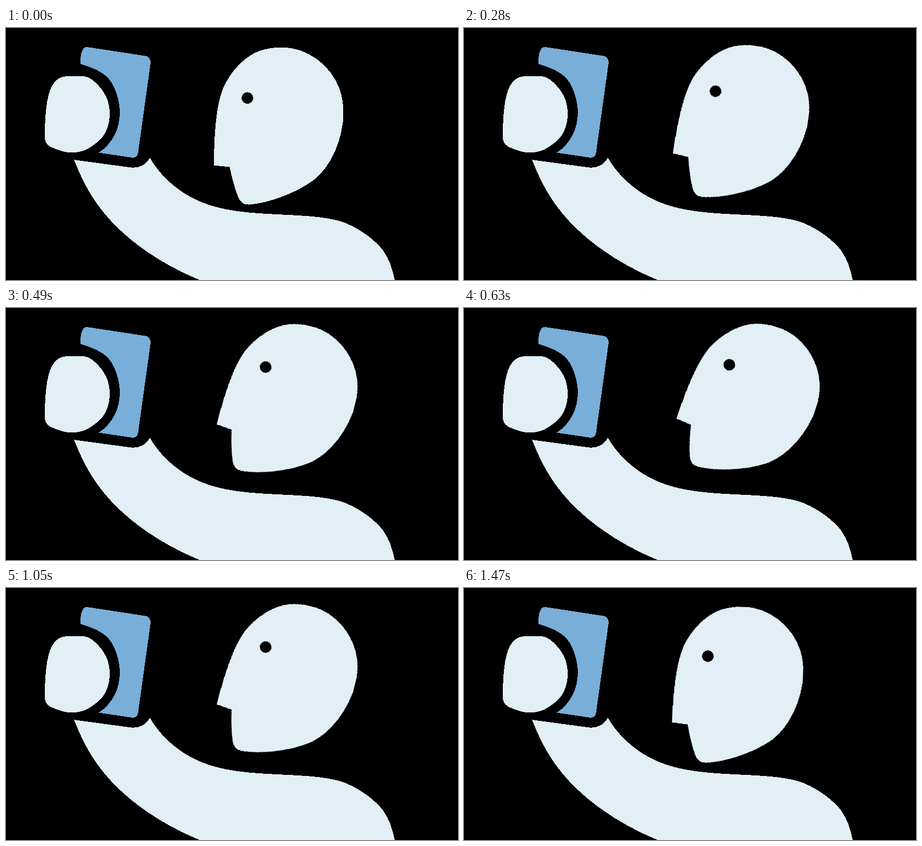
Recreate the animation shown at these times as an HTML page. Size 850x476 px, loop 1610 ms.

```html
<!DOCTYPE html>
<html lang="en">
<head>
<meta charset="utf-8">
<title>Looking at the phone</title>
<style>
  html, body { margin: 0; width: 100%; height: 100%; overflow: hidden; background: #000; }
  svg { display: block; width: 100%; height: 100%; shape-rendering: crispEdges; }
  .skin { fill: #e2eff7; }
  .phone { fill: #78aed8; }
  .head {
    transform-origin: 555.3px 261.5px;
    animation: nod 1610ms infinite;
  }
  /* 2 degrees every 70 ms, up and back, with a short hold at the end */
  @keyframes nod {
    0% { transform: rotate(0deg); animation-timing-function: steps(11, end); }
    47.826% { transform: rotate(22deg); animation-timing-function: steps(10, end); }
    91.304%, 100% { transform: rotate(2deg); }
  }
</style>
</head>
<body>
<svg viewBox="0 0 850 476">
  <path class="skin" d="M128 249 L230 262.8 C250 266.5 264 258 270.5 245 C290 279 322 309 363 327
    C410 348 470 350 520 352.5 C570 355 610 357 640 369 C670 382 695 402 709 420
    C720 435 727 455 731 476 H364 C310 453.5 256 422 211 378.5 C169 337 148 300 128 249Z"/>
  <path class="phone" d="M140 68 V58 C141 47 144 35 153 36 L261 52.5 Q273 54 271.8 67
    L248.5 235 Q247 246 237 244.8 L174.5 235.5 C199 219 214 192 214 160
    C214 138 206 112 194 97 C182 82 160 74 140 68Z"/>
  <path class="skin" d="M73 207 C73 165 76 130 86 110 C94 96 103 91 118 91 H144
    C153 91 159 95 167 102 C185 118 195 137 195 162 C195 186 186 205 170 217
    C157 228 143 235.5 124 235.5 C110 235.5 93 229 83 224 Q73 218 73 207Z"/>
  <g class="head">
    <path class="skin" d="M391 259.5 L420.5 262.5 C426 287 430 303 437 320
      C441 330 447 334 458 333.5 C475 332.5 500 326 517.5 319.2 C544 309.5 564 298 579.5 286.5
      C612 261 634.5 208 634.5 160 C634.5 144 632 128 627 114.6 C611 70 566 36.5 519 36.5
      C504 36.5 490 38.7 476.6 43.3 C449 53 421.5 83 408.5 113.5 C395 145 391 203 391 259.5Z"/>
    <circle cx="454" cy="132.2" r="10.8"/>
  </g>
</svg>
</body>
</html>
```
